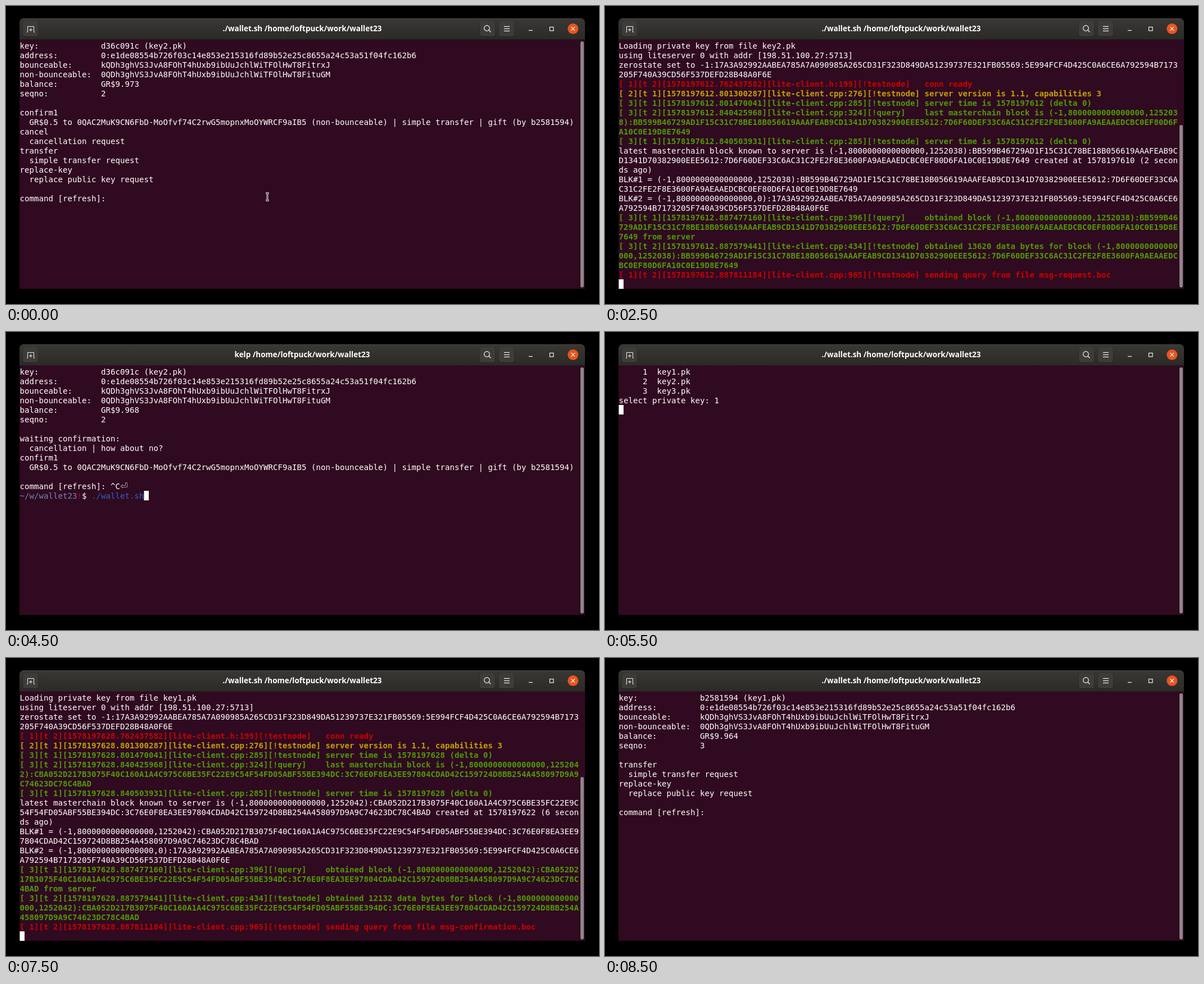
Write an HTML page with a canvas that moves like this. It is 1055 px wide and 531 px high and loops after 9000 ms.

```html
<!DOCTYPE html>
<html lang="en">
<head>
<meta charset="utf-8">
<title>Wallet terminal</title>
<style>
html, body { margin: 0; width: 100%; height: 100%; overflow: hidden; background: #000; }
canvas { display: block; width: 1055px; height: 531px; }
</style>
</head>
<body>
<canvas id="stage" width="1055" height="531"></canvas>
<script>
const ctx = document.getElementById('stage').getContext('2d');
const COLS = 117, CELL = 8.5, LINE = 17, LEFT = 24.5, TOP = 62;
const STEP = 500, LOOP = 9000;
const MONO = '14.12px "DejaVu Sans Mono", "Noto Sans Mono", monospace';
const WHITE = '#fff', GREEN = '#4e9a06', RED = '#cc0000', YELLOW = '#c4a000';
const HOME = '/home/loftpuck/work/wallet23';

// ---- log output ----
const ACCOUNT = '0:E1DE08554B726F03C14E853E215316FD89B52E25C8655A24C53A51F04FC162B6';
const ZERO = '17A3A92992AABEA785A7A090985A265CD31F323D849DA51239737E321FB05569:5E994FCF4D425C0A6CE6A792594B7173205F740A39CD56F537DEFD28B48A0F6E';
const HASH_A = 'BB599B46729AD1F15C31C78BE18B056619AAAFEAB9CD1341D70382900EEE5612:7D6F60DEF33C6AC31C2FE2F8E3600FA9AEAAEDCBC0EF80D6FA10C0E19D8E7649';
const HASH_B = 'CBA052D217B3075F40C160A1A4C975C6BE35FC22E9C54F54FD05ABF55BE394DC:3C76E0F8EA3EE97804CDAD42C159724D8BB254A458097D9A9C74623DC78C4BAD';
const SHARD = '9E157F084D432F9092980643164C0B871020CA162F4799119363907B1D72F86C:FD1EF3A1B1179DEA2FA948EAA6C7A3C572FEFDEACAD9491234D803E6FB761734';

const block = (seq, hash) => `(-1,8000000000000000,${seq}):${hash}`;
const plain = text => [{ text, color: WHITE }];
const LEVELS = { 1: RED, 2: YELLOW, 3: GREEN };

function entry(level, thread, time, place, tag, message) {
  const head = `[ ${level}][t ${thread}][${time}][lite-client.${place}][!${tag}]`;
  const tab = (Math.floor(head.length / 8) + 1) * 8;
  return [{ text: head.padEnd(tab) + message, color: LEVELS[level], bold: true }];
}

const latest = (id, now, made) => plain(
  `latest masterchain block known to server is ${id} created at ${made} (${now - made} seconds ago)`);

const fetched = (id, now, bytes, t1, t2) => [
  entry(3, 1, `${now}.${t1}`, 'cpp:396', 'query', `obtained block ${id} from server`),
  entry(3, 2, `${now}.${t2}`, 'cpp:434', 'testnode', `obtained ${bytes} data bytes for block ${id}`)
];

function sendLog(key, id, now, made, bytes, file) {
  const clock = `server time is ${now} (delta 0)`;
  return [
    plain(`Loading private key from file ${key}`),
    plain('using liteserver 0 with addr [198.51.100.27:5713]'),
    plain(`zerostate set to -1:${ZERO}`),
    entry(1, 2, `${now}.762437582`, 'h:199', 'testnode', 'conn ready'),
    entry(2, 1, `${now}.801300287`, 'cpp:276', 'testnode', 'server version is 1.1, capabilities 3'),
    entry(3, 1, `${now}.801470041`, 'cpp:285', 'testnode', clock),
    entry(3, 2, `${now}.840425968`, 'cpp:324', 'query', `last masterchain block is ${id}`),
    entry(3, 1, `${now}.840503931`, 'cpp:285', 'testnode', clock),
    latest(id, now, made),
    plain(`BLK#1 = ${id}`),
    plain(`BLK#2 = ${block(0, ZERO)}`),
    ...fetched(id, now, bytes, '887477160', '887579441'),
    entry(1, 2, `${now}.887811184`, 'cpp:965', 'testnode', `sending query from file ${file}`)
  ];
}

function accountLog(id, now, made, bytes, shardSeq, balance) {
  return [
    ...fetched(id, now, bytes, '520325422', '520442486'),
    entry(3, 2, `${now}.556342602`, 'cpp:324', 'query', `last masterchain block is ${id}`),
    entry(3, 2, `${now}.556468248`, 'cpp:285', 'testnode', `server time is ${now} (delta 0)`),
    latest(id, now, made),
    entry(3, 2, `${now}.556592941`, 'cpp:999', 'testnode',
      `requesting account state for ${ACCOUNT} with respect to ${id} with savefile \`contract-data.boc\` and mode 2`),
    entry(3, 1, `${now}.597025156`, 'cpp:1123', 'testnode',
      `got account state for ${ACCOUNT} with respect to blocks ${id} and (0,e000000000000000,${shardSeq}):${SHARD}`),
    plain(`account balance is ${balance}ng`),
    plain(`written data of account ${ACCOUNT} to file \`contract-data.boc\` (200 bytes)`)
  ];
}

function wrap(lines) {
  return lines.flatMap(line => {
    const { text, ...style } = line[0];
    if (line.length > 1 || text.length <= COLS) return [line];
    const rows = [];
    for (let i = 0; i < text.length; i += COLS) rows.push([{ ...style, text: text.slice(i, i + COLS) }]);
    return rows;
  });
}

// ---- wallet screens ----
const GIFT = '  GR$0.5 to 0QAC2MuK9CN6FbD-MoOfvf74C2rwG5mopnxMoOYWRCF9aIB5 (non-bounceable) | simple transfer | gift';
const BY = ' (by b2581594)';
const CANCEL = '  cancellation | how about no?';
const ACTIONS = ['transfer', '  simple transfer request', 'replace-key', '  replace public key request'];
const PROMPT = 'command [refresh]: ';

const status = (key, balance, seqno, items, ...input) => [
  'key:             ' + key,
  'address:         ' + ACCOUNT.toLowerCase(),
  'bounceable:      kQDh3ghVS3JvA8FOhT4hUxb9ibUuJchlWiTFOlHwT8FitrxJ',
  'non-bounceable:  0QDh3ghVS3JvA8FOhT4hUxb9ibUuJchlWiTFOlHwT8FituGM',
  'balance:         GR$' + balance,
  'seqno:           ' + seqno,
  '', ...items, '', PROMPT + input[0], ...input.slice(1)
].map(plain);

const KEY1 = 'b2581594 (key1.pk)', KEY2 = 'd36c091c (key2.pk)';
const request = (...input) => status(KEY2, '9.973', 2,
  ['confirm1', GIFT + BY, 'cancel', '  cancellation request', ...ACTIONS], ...input);
const waiting = input => status(KEY2, '9.968', 2,
  ['waiting confirmation:', CANCEL, 'confirm1', GIFT + BY], input);
const confirm = input => status(KEY1, '9.968', 2,
  ['waiting confirmation:', GIFT, 'confirm1', CANCEL + ' (by d36c091c)'], input);

function shell(command) {
  const rows = waiting('^C');
  rows[rows.length - 1].push({ text: '\u23ce', color: '#b5a9b1', font: '16px "DejaVu Sans", sans-serif' });
  rows.push([
    { text: '~/w/wallet23', color: '#7587b8' },
    { text: '!', color: RED },
    { text: '$ ', color: WHITE },
    { text: command, color: '#2f62c6' }
  ]);
  return rows;
}

const picker = ['     1  key1.pk', '     2  key2.pk', '     3  key3.pk', 'select private key: 1'].map(plain);
const BLOCK_A = block(1252038, HASH_A), BLOCK_B = block(1252042, HASH_B);
const BLOCK_C = block(1252040, HASH_B.split(':').reverse().join(':'));
const blank = plain('');

const screen = (lines, opts = {}) => ({
  rows: wrap(lines), cursor: true, bar: 63, title: './wallet.sh ' + HOME, ...opts
});
const shellTitle = { title: 'kelp ' + HOME };

const screens = [
  screen(request(''), { cursor: false, mouse: true }),
  screen(request('can')),
  screen(request('cancel')),
  screen(request('cancel', 'comment: how abou')),
  screen(request('cancel', 'comment: how about no?')),
  screen([...sendLog('key2.pk', BLOCK_A, 1578197612, 1578197610, 13620, 'msg-request.boc'), blank], { bar: 212 }),
  screen(accountLog(BLOCK_A, 1578197613, 1578197610, 13620, 1647172, 9968793853), { bar: 316, cursor: false }),
  screen(waiting('')),
  screen(shell(''), shellTitle),
  screen(shell('./wallet.sh'), shellTitle),
  screen([...accountLog(BLOCK_C, 1578197621, 1578197617, 12874, 1647178, 9968793853), blank], { bar: 236 }),
  screen([...picker, blank]),
  screen(confirm('')),
  screen(confirm('con')),
  screen(confirm('confirm1')),
  screen([...sendLog('key1.pk', BLOCK_B, 1578197628, 1578197622, 12132, 'msg-confirmation.boc'), blank], { bar: 212 }),
  screen([...accountLog(BLOCK_B, 1578197629, 1578197622, 12132, 1647182, 9964386217), blank], { bar: 316 }),
  screen(status(KEY1, '9.964', 3, ACTIONS, ''), { cursor: false })
];

// ---- drawing ----
function box(x, y, w, h, r, fill) {
  ctx.beginPath();
  ctx.roundRect(x, y, w, h, r);
  ctx.fillStyle = fill;
  ctx.fill();
}

function stroke(points, color, width = 1) {
  ctx.beginPath();
  points.forEach(([x, y], i) => i ? ctx.lineTo(x, y) : ctx.moveTo(x, y));
  ctx.strokeStyle = color;
  ctx.lineWidth = width;
  ctx.stroke();
}

function button(x) {
  box(x - 0.5, 27, 28, 28, 4, '#252422');
  box(x, 27, 27, 27, 4, '#3d3c39');
}

function drawWindow(title) {
  ctx.fillStyle = '#000';
  ctx.fillRect(0, 0, 1055, 531);
  const shade = ctx.createLinearGradient(0, 22, 0, 60);
  shade.addColorStop(0, '#393835');
  shade.addColorStop(1, '#2b2a27');
  box(24, 22, 1006, 38, [7, 7, 0, 0], shade);
  stroke([[30, 22.5], [1024, 22.5]], '#4a4946');
  ctx.fillStyle = '#300a20';
  ctx.fillRect(24, 60, 1006, 444);
  stroke([[24, 59.5], [1030, 59.5]], '#211f1d');

  ctx.font = 'bold 13.5px "Open Sans", "Noto Sans", sans-serif';
  ctx.textAlign = 'center';
  ctx.fillStyle = WHITE;
  ctx.fillText(title, 527, 45);
  ctx.textAlign = 'left';

  [30, 843, 877].forEach(button);
  const ink = '#f2f2f1';
  stroke([[37, 46.5], [38.5, 46.5], [38.5, 36.5], [49.5, 36.5], [49.5, 46.5], [51, 46.5]], ink);
  stroke([[41, 42.5], [47, 42.5]], ink);
  stroke([[44, 39.5], [44, 45.5]], ink);
  ctx.beginPath();
  ctx.arc(855.5, 39.5, 4.8, 0, Math.PI * 2);
  ctx.strokeStyle = ink;
  ctx.lineWidth = 1.2;
  ctx.stroke();
  stroke([[859, 43], [862.5, 46.5]], ink, 1.3);
  [36.5, 40.5, 44.5].forEach(y => stroke([[886, y], [896, y]], ink, 1.2));
  stroke([[930, 43.5], [937, 43.5]], ink, 1.2);
  ctx.strokeRect(967.5, 37.5, 6.5, 6.5);
  box(999.3, 31, 19, 19, 9.5, '#e95420');
  stroke([[1005.5, 37.2], [1012.1, 43.8]], WHITE, 1.2);
  stroke([[1012.1, 37.2], [1005.5, 43.8]], WHITE, 1.2);
}

function drawRow(spans, row) {
  let col = 0;
  for (const { text, color, bold, font } of spans) {
    ctx.font = font || (bold ? 'bold ' : '') + MONO;
    ctx.fillStyle = color;
    for (const ch of text) {
      if (ch !== ' ') ctx.fillText(ch, LEFT + col * CELL, TOP + row * LINE + 14);
      col++;
    }
  }
  return col;
}

function drawMouse() {
  for (const [color, width] of [['#e8e8e8', 3], ['#2a1822', 1]]) {
    stroke([[462, 333.5], [468, 333.5]], color, width);
    stroke([[465, 333.5], [465, 346.5]], color, width);
    stroke([[462, 346.5], [468, 346.5]], color, width);
  }
}

function draw({ rows, cursor, bar, title, mouse }) {
  drawWindow(title);
  let col = 0;
  rows.forEach((spans, i) => { col = drawRow(spans, i); });
  if (cursor) {
    ctx.fillStyle = WHITE;
    ctx.fillRect(LEFT + col * CELL, TOP + (rows.length - 1) * LINE, CELL, LINE);
  }
  box(1022, bar, 6, 501.5 - bar, 3, '#8d8588');
  if (mouse) drawMouse();
}

const start = performance.now();
let shown = -1;
function tick() {
  const step = Math.floor((performance.now() - start) % LOOP / STEP);
  if (step !== shown) draw(screens[shown = step]);
  requestAnimationFrame(tick);
}
tick();
</script>
</body>
</html>
```
